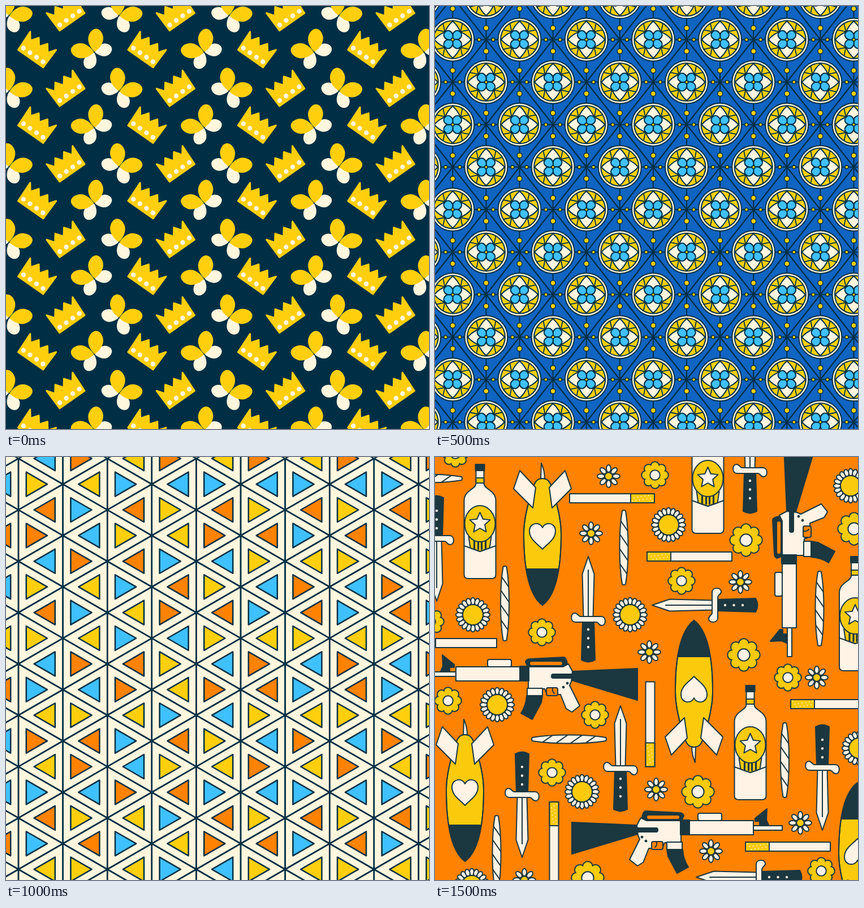
An HTML page with a canvas that plays this animation: 748x748 px, repeating every 2 s.

```html
<!DOCTYPE html>
<html lang="en">
<head>
<meta charset="utf-8">
<title>Four patterns</title>
<style>
  html, body { margin: 0; width: 100%; height: 100%; overflow: hidden; }
  canvas { display: block; }
</style>
</head>
<body>
<canvas id="stage" width="748" height="748"></canvas>
<script>
const SIZE = 748, HOLD = 500;
const ctx = document.getElementById('stage').getContext('2d');
const navy = '#002f45', gold = '#ffcf0d', cream = '#fff6de', sky = '#3fc1ff', orange = '#ff8200';
let ink = navy;

function paint(d, fill, width = 2) {
  const path = new Path2D(d);
  if (fill) { ctx.fillStyle = fill; ctx.fill(path); }
  if (width) { ctx.strokeStyle = ink; ctx.lineWidth = width; ctx.stroke(path); }
}

function oval(x, y, rx, ry, fill, width) {
  const path = new Path2D();
  path.ellipse(x, y, rx, ry, 0, 0, Math.PI * 2);
  paint(path, fill, width);
}
const disc = (x, y, r, fill, width) => oval(x, y, r, r, fill, width);

function box(x, y, w, h, fill, radius = 0) {
  const path = new Path2D();
  path.roundRect(x, y, w, h, radius);
  paint(path, fill);
}

function at(x, y, draw, angle = 0, flip = 1) {
  ctx.save();
  ctx.translate(x, y);
  ctx.rotate(angle * Math.PI / 180);
  ctx.scale(flip, 1);
  draw();
  ctx.restore();
}
const around = (n, draw, start = 0) => {
  for (let i = 0; i < n; i++) at(0, 0, draw, start + i * 360 / n);
};
const place = (draw, ...spots) => spots.forEach(([x, y, angle, flip]) => at(x, y, draw, angle, flip));

function inside(d, draw) {
  ctx.save();
  ctx.clip(new Path2D(d));
  draw();
  ctx.restore();
}

function background(color) {
  ctx.fillStyle = color;
  ctx.fillRect(0, 0, SIZE, SIZE);
}

// Crowns and butterflies
function crown() {
  let outline = 'M-27 19H27';
  for (let i = 0; i < 7; i++) outline += `L${28 - i * 56 / 6} ${i % 2 ? -7 : -19.5}`;
  ink = gold;
  paint(outline + 'Z', gold, 3);
  ink = navy;
  for (let i = 0; i < 4; i++) disc(-21 + i * 14, 11, 4.2, cream, 0);
}

function butterfly() {
  const wing = (angle, sx, sy, color) => at(0, 0, () => {
    ctx.scale(sx, sy);
    paint('M0 -1C-8 -7 -15 -18 -13 -28C-11 -37 -5 -42 0 -42C5 -42 11 -37 13 -28C15 -18 8 -7 0 -1Z', color, 0);
  }, angle);
  for (const side of [-1, 1]) wing(side * 115, .84, .75, cream);
  for (const side of [-1, 1]) wing(side * 44, 1, 1, gold);
}

function crowns() {
  background(navy);
  for (let x = -194.4; x < SIZE; x += 194.4)
    for (let y = -133.6; y < SIZE; y += 133.6) {
      place(crown, [x + 54.5, y + 77.5, 35], [x + 106, y + 146, -35]);
      place(butterfly, [x + 156.5, y + 82, -39], [x + 199.5, y + 151, 39]);
    }
}

// Round floral tiles
function medallion() {
  disc(0, 0, 38, cream);
  disc(0, 0, 33.5, gold);
  around(4, () => paint('M17 -28L14 -14L28 -17', null, 1.8));
  around(4, () => paint('M0 0L-13.5 -13.5Q-9 -25 0 -32.5Q9 -25 13.5 -13.5Z', cream, 0));
  around(4, () => paint('M-13.5 -13.5Q-9 -25 0 -32.5Q9 -25 13.5 -13.5', null));
  around(4, () => paint('M0 -1C-11 -6 -9 -19 0 -19C9 -19 11 -6 0 -1Z', sky, 2.2), 45);
  disc(0, 0, 2.8, gold, 1.8);
}

function crossing() {
  paint('M-59 -75L59 75M59 -75L-59 75M-22 0H22M0 -38V38', null, 2);
  for (const side of [-1, 1]) {
    disc(0, side * 20.5, 4.5, gold, 1.6);
    disc(side * 12.5, 0, 3, gold, 1.6);
  }
}

function medallions() {
  background('#1064c2');
  for (const odd of [1, 0])
    for (let i = -1; i < 14; i++)
      for (let j = -1; j < 11; j++)
        if (((i + j) & 1) === odd)
          at(31.3 + i * 59.1, 59.4 + j * 75.15, odd ? crossing : medallion);
}

// Triangular lattice: every three rows of a column hold the three hues, shuffled
const hues = { Y: gold, B: sky, O: orange };
const orders = ['YBO', 'YOB', 'BYO', 'BOY', 'OYB', 'OBY'];
const shuffles = ['254202', '432254', '010432', '505010', '054505', '542454', '024202'];

function triangle(r, fill) {
  const half = r * Math.sqrt(3);
  paint(`M${-r} ${-half}L${2 * r} 0L${-r} ${half}Z`, fill, 2.5);
}

function triangles() {
  background(cream);
  const width = 78.6, row = 45.4;
  for (let i = -1; i < 10; i++) {
    const shuffle = shuffles[i] || shuffles[i % 2 ? 5 : 6];
    for (let k = 0; k < 18; k++) {
      const right = (i + k) % 2 !== 0 ? 0 : 1;
      const hue = hues[orders[shuffle[Math.floor(k / 3)]][k % 3]];
      at(22 + (i + (right ? 2 : 1) / 3) * width, 2.7 + k * row, () => {
        triangle(width / 3);
        triangle(12.4, hue);
      }, 0, right ? -1 : 1);
    }
  }
}

// Flowers and objects
const pale = '#fff3e5', amber = '#fbca0c', slate = '#1b3740';

function daisy() {
  around(20, () => oval(0, -24, 4, 6.2, pale));
  disc(0, 0, 18, amber);
}

function aster() {
  around(8, () => oval(0, -13.5, 4, 6.5, pale));
  disc(0, 0, 6.8, amber);
}

function blossom(r) {
  for (const outline of [4, 0])
    around(8, () => disc(0, -r * .7, r * .29, amber, outline));
  disc(0, 0, r * .74, amber, 0);
  disc(0, 0, r * .38, pale);
}

function bottle() {
  paint('M-7 8V34C-7 44 -28 46 -28 64V195Q-28 202 -20 202H20Q28 202 28 195V64C28 46 7 44 7 34V8Z', pale);
  box(-7, 24, 14, 9, amber);
  box(-8, 0, 16, 11, slate);
  paint('M-28 144L0 154L28 144', null);
  paint('M-20 128L-17 148L0 154L17 148L20 128Z', amber);
  for (const x of [-10, -3, 3, 10]) paint(`M${x} 134V150`, null, 3.2);
  oval(0, 105, 27, 32, amber);
  let star = 'M0 85';
  for (let i = 1; i < 10; i++) {
    const r = i % 2 ? 9 : 19, a = i * Math.PI / 5;
    star += `L${r * Math.sin(a)} ${104 - r * Math.cos(a)}`;
  }
  paint(star + 'Z', pale);
}

function bomb() {
  const body = 'M0 -98C8 -98 12 -94 15 -86C24 -60 33 -30 33 0C33 60 24 108 0 126C-24 108 -33 60 -33 0C-33 -30 -24 -60 -15 -86C-12 -94 -8 -98 0 -98Z';
  paint('M-3 -97L-2 -125Q4 -112 4 -97Z', pale);
  paint(body, amber);
  inside(body, () => box(-40, 62, 80, 70, slate));
  paint(body, null);
  for (const side of [-1, 1])
    at(0, 0, () => paint('M40 -112L51 -80L17 -46L12 -82Z', pale), 0, side);
  paint('M0 27C-8 18 -23 10 -23 -5C-23 -21 -4 -22 0 -11C4 -22 23 -21 23 -5C23 10 8 18 0 27Z', pale);
}

function dagger() {
  paint('M0 0L10.5 31L8.5 108H-8.5L-10.5 31Z', pale);
  paint('M0 24V108', null);
  paint('M-10 114H10L12 183Q0 190 -12 183Z', slate);
  for (let i = 0; i < 3; i++) disc(0, 129 + i * 15.5, 2.2, pale, 0);
  paint('M-24 100C-18 100 -18 106 -14 106H23C32 106 32 122 24 122C18 122 19 116 14 116H-23C-32 116 -32 100 -24 100Z', pale);
}

function cigarette() {
  box(-75, -8, 150, 16, pale);
  box(-75, -8, 42, 16, amber);
  for (let i = 0; i < 12; i++) disc(-71 + i * 3.2, (i * 5) % 11 - 5, .9, pale, 0);
}

function twist() {
  const body = 'M-3 -65Q0 -67 3 -65C9 -30 9 30 3 65Q0 67 -3 65C-9 30 -9 -30 -3 -65Z';
  paint(body, pale);
  inside(body, () => {
    for (let y = -39; y < 50; y += 26) paint(`M-9 ${y - 13}L9 ${y + 13}`, null);
  });
}

function rifle() {
  paint('M13 350L34 367V372H26V379H10L14 370Z', slate);
  box(-14, 380, 52, 8, pale);
  box(93, 358, 42, 13, pale, 3);
  box(37, 371, 114, 25, pale);
  paint('M162 422H190L188 434L172 464L152 453Q161 440 162 422Z', slate);
  paint('M165 374L160 362Q162 357 168 357L228 354Q233 356 234 366L236 374Z', slate);
  box(167, 361, 59, 8, orange, 4);
  paint('M165 371H226L236 366L243 379L241 397L238 404L256 440L242 451L232 445L222 420H198L194 410H165Z', pale);
  box(163, 409, 27, 13, pale);
  box(197, 408, 20, 14, orange, 3);
  paint('M208 409Q207 415 211 418', null);
  box(150, 370, 16, 26, slate);
  paint('M244 379L358 374V430L242 395Z', slate);
  box(206, 384, 40, 7, slate, 3);
  disc(227, 407, 2, slate, 1);
  disc(234, 400, 2, slate, 1);
}

function objects() {
  background(orange);
  ink = slate;
  place(rifle, [0, 0], [243, 339, -90], [600, 272, 0, -1]);
  place(bottle, [79.5, 13], [482.5, -67], [743, 176], [557.5, 404]);
  place(bomb, [190, 136], [53, 589], [458, 415, 180], [747, 702, 180]);
  place(dagger, [271, 176], [328, 440], [557, -87], [154, 708, 180], [685, 660, 180], [3, 255, 180],
    [384, 262, -90], [462, 743, -90]);
  place(cigarette, [313, 73, 180], [450, 176], [704, 437], [624, 689], [34, 329],
    [380.5, 472.5, -90], [210.5, 685, 90]);
  place(twist, [334, 160], [123.5, 259], [680, 268], [618.5, 536], [109, 700], [237, 499, -90], [-18, 38, -90]);
  place(daisy, [413, 120], [67, 279], [345, 279], [110, 438], [260, 592], [735, 51], [750, 515], [65, 758]);
  place(aster, [307, 34], [276, 135], [540, 221], [379, 345], [675, 390], [391, 588], [646, 647],
    [488, 697], [158, 748]);
  place(() => blossom(28), [550, 147], [546, 350], [465, 592], [270, 744], [741, 127]);
  place(() => blossom(23), [389, 32], [436, 219], [189, 310], [283, 456], [23, 431], [207, 558],
    [624, 390], [683, 732], [36, -6], [-8, 291]);
  ink = navy;
}

ctx.lineJoin = ctx.lineCap = 'round';
const scenes = [crowns, medallions, triangles, objects];
let shown = -1;

function tick() {
  const index = Math.floor(performance.now() / HOLD) % scenes.length;
  if (index !== shown) scenes[shown = index]();
  requestAnimationFrame(tick);
}
tick();
</script>
</body>
</html>
```
